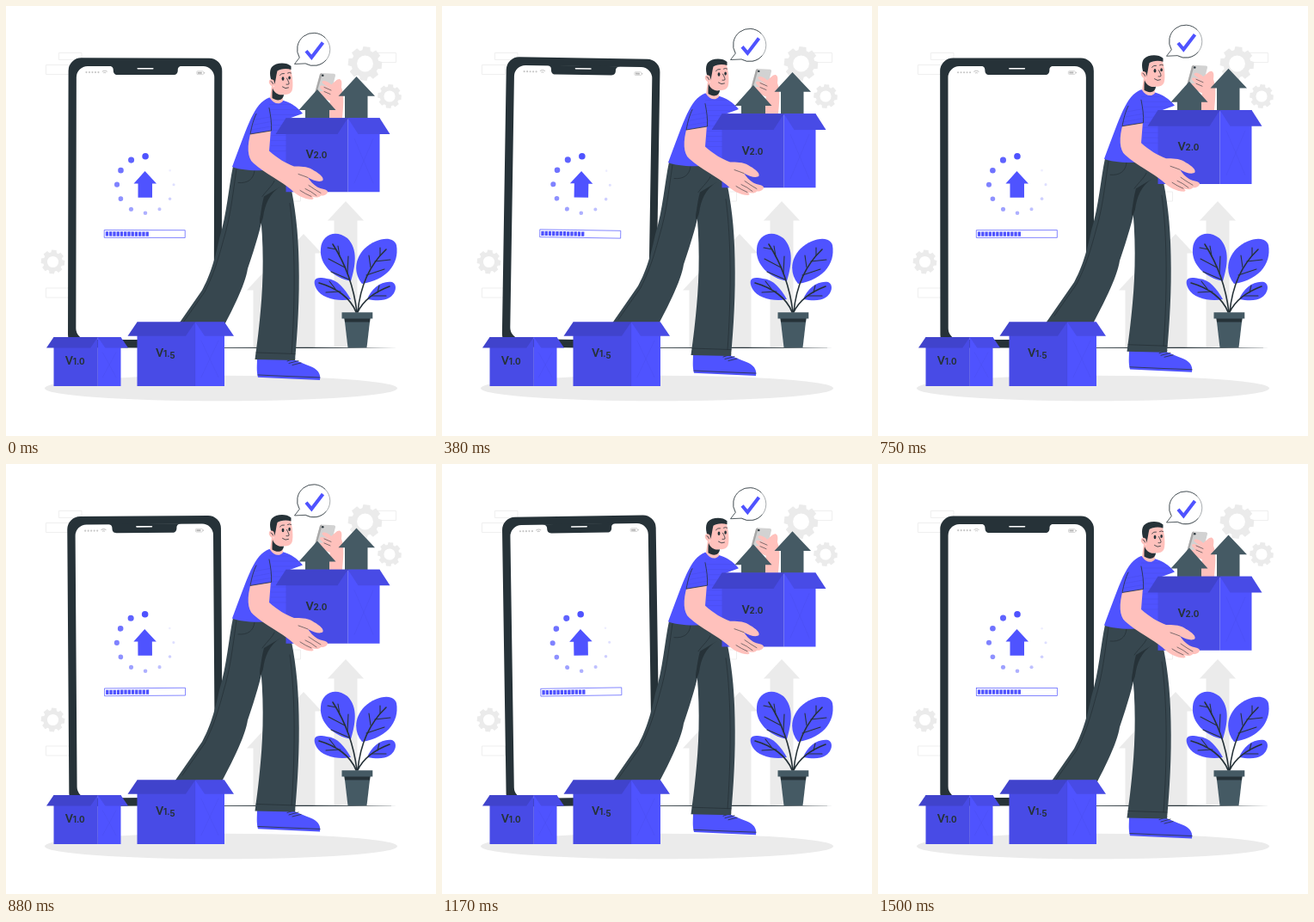
These frames come from a looping animation (500 px wide and 500 px high, 1.54 s). An HTML page:

```html
<!DOCTYPE html>
<html lang="en">
<head>
<meta charset="utf-8">
<title>App update</title>
<style>
html, body { margin: 0; width: 100%; height: 100%; overflow: hidden; background: #fff; }
svg { display: block; width: 100vw; height: 100vh; }
.blue { fill: #4f53ff; }
.dark { fill: #263238; }
.slate { fill: #455a64; }
.pale { fill: #ebebeb; }
.skin { fill: #ffc1bc; }
.cloth { fill: #37474f; }
.ln { fill: none; stroke: #263238; stroke-width: .8; stroke-linecap: round; stroke-linejoin: round; }
.thin { stroke-width: .6; }
.vein { stroke-width: 1.1; }
.stem { stroke-width: 1.6; }
.frame { fill: none; stroke: #ebebeb; stroke-width: .8; }
.crease { fill: none; stroke: #000; stroke-width: .6; opacity: .06; }
.stripe { fill: none; stroke: #000; stroke-width: .6; opacity: .09; }
.label { font: 800 12.5px Lato, "Open Sans", sans-serif; fill: #263238; }
.label tspan { font: 700 9.8px Inter, Roboto, sans-serif; }
</style>
</head>
<body>
<svg viewBox="0 0 500 500">
  <g id="back">
    <path class="frame" d="M61.5 54.5h26.5v8h-26.5zM46.5 68.5h27v11h-27zM430 54.5h23.5v11h-23.5zM46.5 328h27v11h-27zM322 216h20.5v11h-20.5z"/>
  </g>
  <ellipse class="pale" cx="250" cy="444.5" rx="205" ry="14.8"/>
  <path class="dark" d="M240 396.9L350 396.8L455 397.4L350 398L240 397.8z"/>

  <g id="phone">
    <rect class="dark" x="72.3" y="60.5" width="178.7" height="337" rx="15"/>
    <rect x="81.6" y="70" width="160.4" height="318" rx="13" fill="#fff"/>
    <path class="dark" d="M119 69.5H205C201 70 199.500 71.500 199.500 74.500C199.500 78 198 80 194.500 80H129.500C126 80 124.500 78 124.500 74.500C124.500 71.500 123 70 119 69.500z"/>
    <path d="M153 72.800H170.500" stroke="#fff" stroke-width="1.6" stroke-linecap="round"/>
    <path d="M93.200 77.200H107.500" stroke="#c7c7c7" stroke-width="2.2" stroke-linecap="round" stroke-dasharray="0 3.5"/>
    <path d="M111.500 76.500q3-2.400 6 0M113 78q1.500-1.200 3 0" fill="none" stroke="#c7c7c7"/>
    <rect x="221.500" y="75.700" width="8" height="3.800" rx="1" fill="none" stroke="#c7c7c7" stroke-width=".7"/>
    <path d="M222.500 76.600h5v2h-5zM230 76.900h.9v1.400h-.9z" fill="#b5b5b5"/>
    <path class="blue" d="M161.500 192L175 206.500H170V222.700H153.500V206.500H148.500z"/>
    <rect x="114.300" y="260.600" width="94" height="8.800" fill="#fff" stroke="#4f53ff" stroke-width=".7"/>
  </g>

  <g id="man">
    <!-- trousers and shoe -->
    <path class="blue" d="M292 410L334 411C339 413.500 346 416.500 354 419.500C362 422.500 366.500 428 365 435.500L326 433.800L293 432.200C291 425 292 418 292 410z"/>
    <path class="ln" d="M293 429.500L326 431L365 432.500M327 413.500L336 410.500M329 416L340 413M333 418L343 415.500"/>
    <path class="cloth" d="M295 235C300 275 299.500 320 296 355C293.500 383 291 400 289.500 411.500L336 412.500C339 380 341.500 340 340.500 300C340 262 336 232 330 205z"/>
    <path class="cloth" d="M264 187C259 210 257 242 248 271C242 300 236 316 228 331L178 403L238 401C263 356 278 325 281 306C291 277 296 258 300 240L330 211L322 185z"/>
    <path class="dark" d="M300 222L320 210C306 218 301 232 299 246C295 260 294 252 296 243C297 236 298 229 300 222z"/>
    <path class="ln" d="M268 190C263 225 261 245 253 272C244 306 238 319 231 333L205 370M270 206C281 207 288 202 289 192M298 222C304 214 310 209 312 204M330 230C337 280 336 350 332 405M291 403.500L336 405"/>

    <!-- shirt -->
    <path class="blue" d="M306 107C288 114 282 138 263 187.500C274 192 300 194 330 188V131L345 125.500C339 118 330 112 321 110z"/>
    <path class="stripe" d="M306 115H334M307 121H341M308 127H343M309 133H326M309 139H326M309 145H326M308 151H326M308 157H326M308 163H326M308 169H326"/>

    <!-- head -->
    <path class="skin" d="M309 93L307 107.500C311 114 318 116 322 111L321 99z"/>
    <path class="skin" d="M311 77L330 71C333 79 334.500 93 332.500 99C330 105 319 105 312 99z"/>
    <path class="dark" d="M311 92C307 86 305.500 76 309 71.500C314 66 326 65.500 331.500 70.500L331.500 74.500C326 72.500 319 73.500 315.500 76C314 81 314 87 312 92z"/>
    <path class="skin" d="M311.500 87C307 83.500 304.500 87.500 306.500 91C308 94 311 94.500 312.500 93z"/>
    <path class="ln" d="M308 88q2 .4 2.500 3"/>
    <path class="dark" d="M310 96C312 101.500 317 105 323 103.500C322.500 110 316 112 309.500 107.500C309.500 103 309.500 99 310 96z"/>
    <path class="ln" d="M318.500 81Q320.500 78.300 323.500 79M327.500 78.500Q329.500 77.200 331.500 78.500M326.500 84.500Q329.500 90 329 91.200Q328 92 326 91.700M321.500 94.500Q325 97.500 328.500 95.500"/>
    <ellipse class="dark" cx="322" cy="85" rx="1.400" ry="2.200"/>
    <ellipse class="dark" cx="329.600" cy="84" rx="1.300" ry="2.100"/>

    <!-- far hand and handset -->
    <path d="M367 78.500L381.500 79.300Q383.500 79.500 383 81.500L376 109L359 102L365 80Q365.500 78.300 367 78.500z" fill="#d2d2d2"/>
    <path d="M366.500 78.500L365 80L359 102L361 103L367.500 80z" fill="#a8a8a8"/>
    <circle class="dark" cx="368.300" cy="81.300" r="1.200"/>
    <path class="skin" d="M378 92C382 89 385 85 388 85.500C391 87 390.500 91 390 95C394 105 392 118 391 131H371L377 111C372 109 365 106 363.500 102C363 99.500 367 99 370 100C366 97 364 95 365.500 93.500C369 92 374 95 378 97C373 93 367 91 367.500 88.500C369 86 376 89 378 92z"/>
    <path class="ln thin" d="M370 100L377 103M370 95L378 98.500"/>

    <!-- parcel -->
    <g class="slate">
      <path d="M362 97.500L383.500 121.500H376V132H348V121.500H340.500z"/>
      <path d="M407.500 82.500L429 105.300H420.500V132H394V105.300H386.500z"/>
    </g>
    <g id="parcel"></g>

    <!-- near arm -->
    <path class="skin" d="M285 146C280 163 280.500 177 287.500 183C301 195 321 205 331 213.500C338 220.500 346 225 356 225.500C359 224.500 357 223 355 222C360 223.500 364 223.500 366 221C370 221.500 374 219 374 216.500C374 213.500 366 213.500 362 211C357 208 354 204 351 200C358 204 366 206 368.500 203C370 199 362 194 356 190.500C350 187 342 187 335 187C325 183 316 178 306 169L308 144z"/>
    <path class="ln thin" d="M340 196Q346 198 351 200M348 213Q355 216 361 221M352 209Q359 214 366 218M342 215Q348 219 355 222"/>
    <path class="blue" d="M302 110C292 117 287 134 284 149.500L308.500 145.500C308 135 307 120 302 110z"/>
    <path class="stripe" d="M285 144.500L308 140.500M286 139L308 135M288 133L307 129.500"/>
    <path class="ln" d="M306 119C308 129 309 137 308.500 145.500L284 149.500C286 139 288 132 291 126"/>

    <!-- speech bubble -->
    <circle cx="357.800" cy="51" r="19" fill="#fff" stroke="#263238" stroke-width=".4"/>
    <path class="ln" style="fill:#fff" d="M372 63.500A19 19 0 0 1 348.300 67.400L335.500 68L341.300 60.500A19 19 0 0 1 371 37.300"/>
    <path d="M349 52.800L355.300 60.300L368.500 43" fill="none" stroke="#4f53ff" stroke-width="4"/>
  </g>

  <g id="plant">
    <g class="blue">
      <path d="M401 320C381 316 364 301 366 282C367 266 383 259 397 270C410 283 406 303 401 320z"/>
      <path d="M414 323C404 311 405 294 417 282C430 270 450 266 454 278C458 301 441 319 414 323z"/>
      <path d="M401 341C387 344 367 340 361 329C355 317 361 314 373 317C386 318 394 329 401 341z"/>
      <path d="M420 341C425 328 437 319 449 321C456 324 453 335 446 339C440 343 431 343 420 341z"/>
    </g>
    <path class="ln stem" d="M408 356C405 331 396 302 380 277M409 356C412 324 424 300 442 283M407 356C401 340 385 328 364 322M409 356C416 341 430 332 446 326"/>
    <path class="ln vein" d="M388 291L386 279M394 304L375 294M399 318L378 309M397 311L398 291M384 283L374 281M424 304L422 290M419 313L440 306M429 297L447 295M435 290L435 281M383 329L376 320M389 332L372 333M432 333L434 325M426 337L442 337"/>
    <path class="slate" d="M393.500 363H423.500L419.500 397.300H397.500z"/>
    <path class="dark" d="M393.500 363H423.500L423 367.500H394z"/>
    <path class="slate" d="M390.500 356.200H426.300V363.500H390.500z"/>
  </g>
  <g id="stack"></g>
</svg>
<script>
const LOOP = 1540;
const $ = id => document.getElementById(id);
const add = (id, html) => $(id).insertAdjacentHTML('beforeend', html);

// Toothed ring with a round hole
function gear(cx, cy, r) {
  const pts = [];
  for (let i = 0; i < 8; i++) {
    for (const [k, off] of [[.8, -.3], [1, -.2], [1, .2], [.8, .3]]) {
      const a = i * Math.PI / 4 + off + .1;
      pts.push((cx + r * k * Math.cos(a)).toFixed(1) + ' ' + (cy + r * k * Math.sin(a)).toFixed(1));
    }
  }
  const h = r * .47;
  return `<path class="pale" fill-rule="evenodd" d="M${pts.join('L')}zM${cx - h} ${cy}a${h} ${h} 0 1 0 ${2 * h} 0a${h} ${h} 0 1 0 ${-2 * h} 0z"/>`;
}

const upArrow = (x, y) =>
  `<path class="pale" d="M${x} ${y}l21 22.500h-7.500V397h-27V${y + 22.5}h-7.500z"/>`;

// Open carton: front of width w, side of width s, flaps reaching out by dx, dy
function carton(x, y, w, s, h, dx, dy, digits, tx, ty) {
  const m = x + w, cx = m + s / 2, top = y + dy + 5, low = y + h - 10;
  const [first, last] = digits;
  const drop = last === '5' ? 2 : 0;
  return `<path fill="#484be6" d="M${x} ${y}h${w}v${h}h${-w}z"/>
    <path class="blue" d="M${m} ${y}h${s}v${h}h${-s}z"/>
    <path class="crease" d="M${m} ${y}v${h}M${cx - s * .3} ${top}L${cx + s * .3} ${low}M${cx + s * .3} ${top}L${cx - s * .3} ${low}"/>
    <path fill="#4043cc" d="M${x} ${y}h${w}l${-dx} ${dy}h${-w}z"/>
    <path fill="#484be6" d="M${m} ${y}h${s}l${dx} ${dy}h${-s}z"/>
    <text class="label" x="${tx}" y="${ty}">V<tspan>${first}.</tspan><tspan dy="${drop}">${last}</tspan></text>`;
}

add('back', gear(417.5, 67, 20) + gear(446, 105, 14) + gear(54.5, 297.5, 14) +
  upArrow(395, 227) + upArrow(346, 265) + upArrow(301, 308));

// Fading spinner dots, then the progress bar cells
let marks = '';
for (let i = 0; i < 11; i++) {
  const a = -Math.PI / 2 - i * Math.PI / 6;
  marks += `<circle class="blue" cx="${162 + 33 * Math.cos(a)}" cy="${207.7 + 33 * Math.sin(a)}" r="${3.8 - i * .25}" opacity="${1 - i * .09}"/>`;
}
for (let i = 0; i < 12; i++) {
  marks += `<rect class="blue" x="${115.9 + i * 4.25}" y="262.400" width="3.300" height="5.300"/>`;
}
add('phone', marks);

add('parcel', carton(325.5, 130.7, 72, 37, 86, 12, 18.7, '20', 348.7, 178));
add('stack',
  carton(55.5, 385, 51.3, 26.7, 57, 8.5, 12.5, '10', 69, 417) +
  carton(152.5, 367.5, 67.5, 34, 74.5, 11, 16.3, '15', 174.3, 408));

function draw(ms) {
  const p = ((ms + 40) % LOOP) / LOOP;
  const lift = 10 * (1 - Math.abs(1 - 2 * p));
  const tilt = p < .25 ? 4 * p : p < .75 ? 2 - 4 * p : 4 * p - 4;
  $('man').setAttribute('transform', `translate(0 ${-lift})`);
  $('phone').setAttribute('transform', `rotate(${tilt} 162 229)`);
}

let start;
function tick(now) {
  if (start === undefined) start = now;
  draw(now - start);
  requestAnimationFrame(tick);
}
draw(0);
requestAnimationFrame(tick);
</script>
</body>
</html>
```
